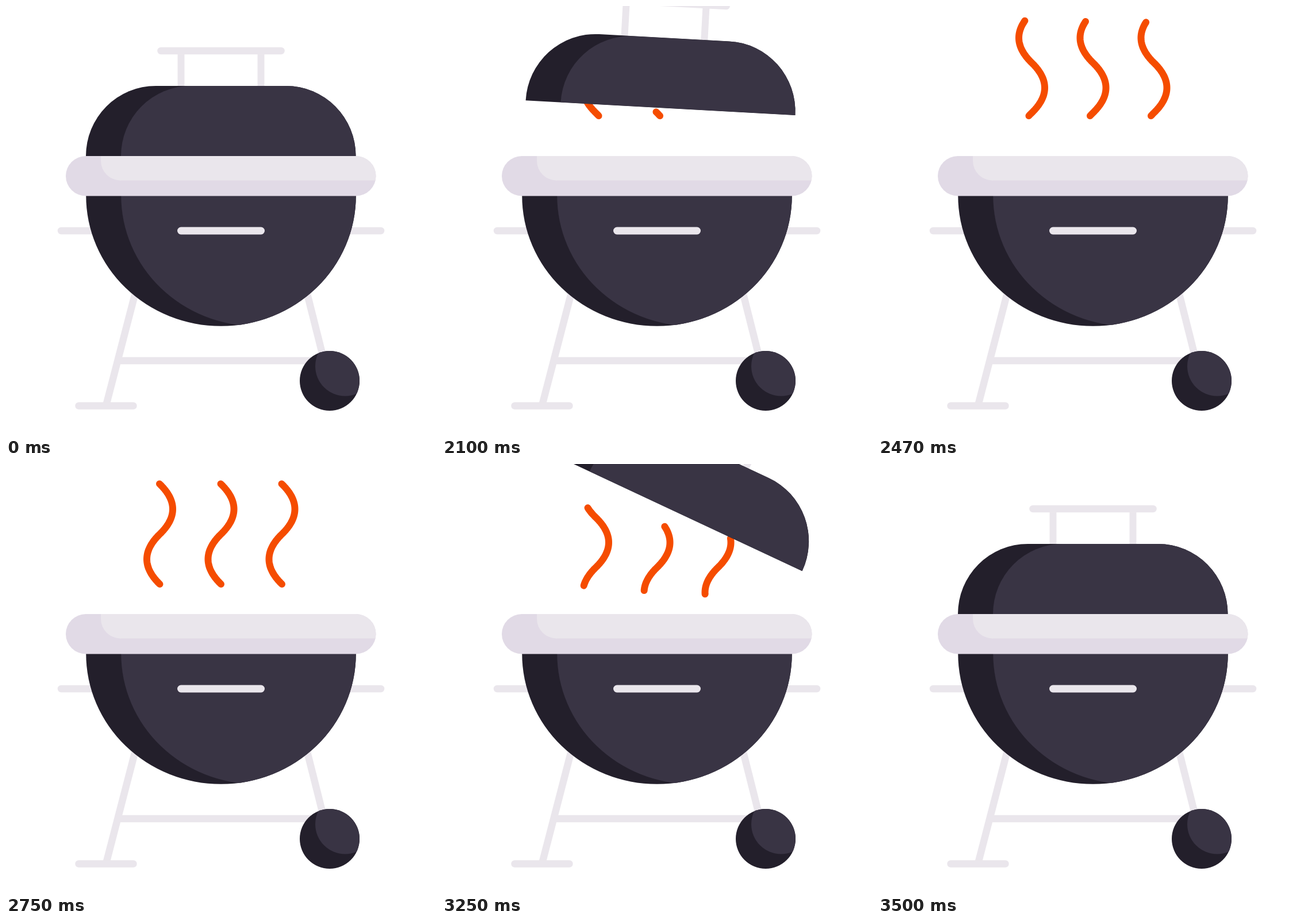
An HTML page with a canvas that plays this animation: 748 px wide and 748 px high, repeating every 3520 ms.

```html
<!DOCTYPE html>
<html lang="en">
<head>
<meta charset="utf-8">
<title>Barbecue</title>
<style>
  html, body { margin: 0; width: 100%; height: 100%; overflow: hidden; background: #fff; }
  canvas { display: block; width: 100vw; height: 100vh; object-fit: contain; }
</style>
</head>
<body>
<canvas id="stage" width="748" height="748"></canvas>
<script>
const ctx = document.getElementById('stage').getContext('2d');
const LOOP = 3520;
const COLOR = {
  body: '#393444', shade: '#231f2b',
  metal: '#eae6ec', metalShade: '#e1dae6', steam: '#f54c00'
};
const FAR_PIVOT = [1908, 333];
const HINGE = [608.5, 261];
const TILT = 25.1;
const HALF_WAVE = 87;

// Each plume has its own timing for the upper and lower end: [time, y].
const PLUMES = [
  { x: 267.5, start: 2025, top: [[3075, 36], [3375, 105], [3500, 134]], bottom: [[3075, 211], [3500, 212.5]] },
  { x: 374, start: 2084, top: [[3075, 42.5], [3375, 156], [3500, 203]], bottom: [[3075, 216], [3500, 226]] },
  { x: 480, start: 2130, top: [[3075, 47], [3375, 188], [3500, 245]], bottom: [[3075, 221], [3500, 234]] }
];

const easeInOut = p => p < 0.5 ? 2 * p * p : 1 - 2 * (1 - p) ** 2;
const clamp01 = p => Math.min(1, Math.max(0, p));

function track(keys, t) {
  let i = 1;
  while (i < keys.length - 1 && t > keys[i][0]) i++;
  const [t0, a] = keys[i - 1], [t1, b] = keys[i];
  return a + (b - a) * clamp01((t - t0) / (t1 - t0));
}

function line(x1, y1, x2, y2, cap = 'round', width = 12.5) {
  ctx.strokeStyle = COLOR.metal;
  ctx.lineWidth = width;
  ctx.lineCap = cap;
  ctx.beginPath();
  ctx.moveTo(x1, y1);
  ctx.lineTo(x2, y2);
  ctx.stroke();
}

// Fills an outline, then a second shape kept inside it.
function shaded(outline, base, inner, light) {
  ctx.save();
  ctx.beginPath();
  outline();
  ctx.fillStyle = base;
  ctx.fill();
  ctx.clip();
  ctx.beginPath();
  inner();
  ctx.fillStyle = light;
  ctx.fill();
  ctx.restore();
}

const circle = (x, y, r) => () => ctx.arc(x, y, r, 0, Math.PI * 2);

const bowl = shift => () => ctx.ellipse(374 + shift, 330, 234.75, 226.75, 0, 0, Math.PI);

const dome = shift => () => {
  ctx.ellipse(260.5 + shift, 261, 121.5, 122, 0, Math.PI, Math.PI * 1.5);
  ctx.ellipse(487 + shift, 261, 121.5, 122, 0, Math.PI * 1.5, Math.PI * 2);
  ctx.closePath();
};

function drawStand() {
  line(96, 391, 160, 391);
  line(590, 391, 652, 391);
  line(227, 491, 174.8, 692, 'butt');
  line(521.5, 491, 551.5, 610, 'butt');
  line(198, 617, 530, 617, 'butt');
  line(126.5, 695.5, 221.5, 695.5);
  shaded(circle(563, 652, 52), COLOR.shade, circle(590, 626.5, 52), COLOR.body);
}

function drawBowl() {
  shaded(bowl(0), COLOR.shade, bowl(61), COLOR.body);
  line(304.5, 391, 443.5, 391, 'round', 13);
  shaded(
    () => ctx.roundRect(104, 261, 539.5, 69.5, 34.75), COLOR.metalShade,
    () => ctx.roundRect(165, 250, 500, 53.5, [0, 0, 0, 34.5]), COLOR.metal
  );
}

function drawPlume(plume, t) {
  const top = t < 2500
    ? track([[plume.start, 191], [2500, 16.5]], t)
    : track([[2500, 16.5], [2750, 34.5], ...plume.top], t);
  const bottom = track([[2500, 191], [2750, 209], ...plume.bottom], t);
  if (t <= plume.start || top >= bottom) return;

  const crossing = 209 - 0.232 * (t - 2750);
  const waveX = y => {
    const u = (y - crossing) / HALF_WAVE, half = Math.floor(u), f = u - half;
    return plume.x + 90 * f * (1 - f) * (half % 2 ? -1 : 1);
  };
  ctx.strokeStyle = COLOR.steam;
  ctx.lineWidth = 12;
  ctx.lineCap = ctx.lineJoin = 'round';
  ctx.beginPath();
  for (let y = top; y < bottom; y += 2) ctx.lineTo(waveX(y), y);
  ctx.lineTo(waveX(bottom), bottom);
  ctx.stroke();
}

function rotateAbout([x, y], degrees) {
  ctx.translate(x, y);
  ctx.rotate(degrees * Math.PI / 180);
  ctx.translate(-x, -y);
}

function drawLid(t) {
  if (t > 2275 && t < 3000) return;
  ctx.save();
  if (t > 2000 && t <= 2275) {
    rotateAbout(FAR_PIVOT, 10.2 * ((t - 2000) / 200) ** 1.7);
  } else if (t >= 3000) {
    const away = 1 - easeInOut(clamp01((t - 3000) / 390));
    const drop = easeInOut(clamp01((t - 3375) / 125));
    ctx.translate(70 * away, -290 * away);
    rotateAbout(HINGE, TILT * (1 - drop));
  }
  line(304.5, 78, 304.5, 142, 'butt', 12);
  line(443.5, 78, 443.5, 142, 'butt', 12);
  line(269.5, 78, 478.5, 78);
  shaded(dome(0), COLOR.shade, dome(61), COLOR.body);
  ctx.restore();
}

function draw(t) {
  ctx.fillStyle = '#fff';
  ctx.fillRect(0, 0, 748, 748);
  drawStand();
  if (t > 2000 && t < 3500) PLUMES.forEach(plume => drawPlume(plume, t));
  drawLid(t);
  drawBowl();
}

// The motion advances in 25 ms steps, shown on a 10 ms clock.
const step = t => Math.floor((t - t % 10 + 5) / 25) * 25;

const begin = performance.now();
function tick() {
  draw(step((performance.now() - begin) % LOOP));
  requestAnimationFrame(tick);
}
tick();
</script>
</body>
</html>
```
